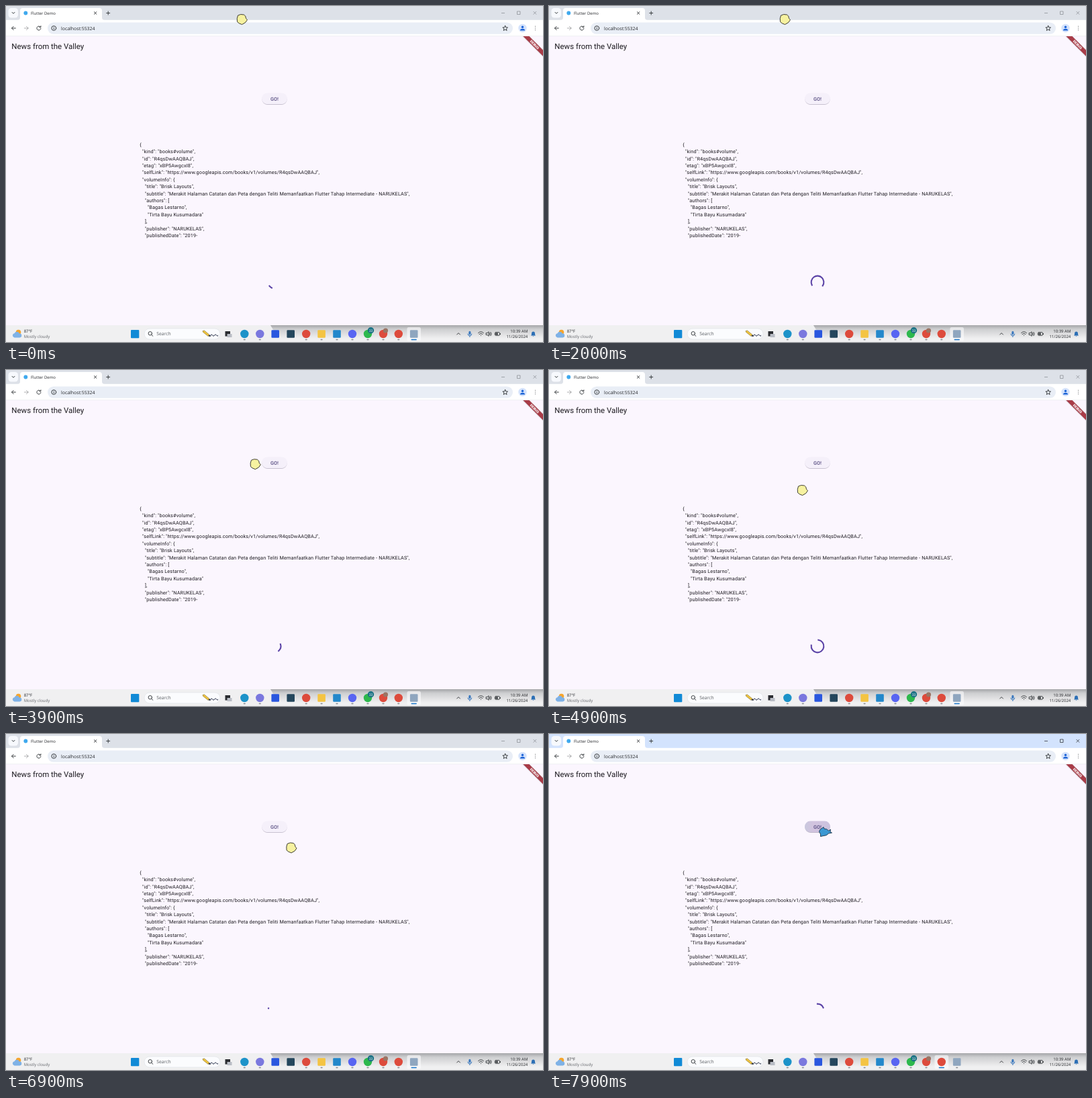
Recreate the animation shown at these times as an HTML page. Size 800 px wide and 500 px high, loop 8 s.

```html
<!DOCTYPE html>
<html lang="en">
<head>
<meta charset="utf-8">
<title>Browser demo</title>
<style>
  html, body { margin: 0; width: 100%; height: 100%; overflow: hidden; background: #fbf6fe; }
  svg { display: block; width: 800px; height: 500px; }
  text { white-space: pre; text-rendering: geometricPrecision; }
  .ui { font-family: "Open Sans", "Noto Sans", sans-serif; fill: #24262a; }
  .app { font-family: Roboto, "Noto Sans", sans-serif; fill: #1d1b20; }
  .line { fill: none; stroke: #3c4043; stroke-width: 1; stroke-linecap: round; stroke-linejoin: round; }
</style>
</head>
<body>
<svg viewBox="0 0 800 500" xmlns="http://www.w3.org/2000/svg">
  <defs>
    <linearGradient id="shade" x1="0" x2="0" y1="0" y2="1">
      <stop offset="0" stop-color="#77797d" stop-opacity=".62"/>
      <stop offset=".3" stop-color="#77797d" stop-opacity=".28"/>
      <stop offset="1" stop-color="#77797d" stop-opacity="0"/>
    </linearGradient>
    <linearGradient id="press">
      <stop offset="0" stop-color="#c9c8de"/>
      <stop offset=".35" stop-color="#d2c3df"/>
      <stop offset="1" stop-color="#cac2de"/>
    </linearGradient>
    <filter id="soft" x="-20%" y="-40%" width="140%" height="190%"><feGaussianBlur stdDeviation=".7"/></filter>
    <clipPath id="page"><rect y="45" width="800" height="430"/></clipPath>
  </defs>

  <!-- tab strip -->
  <rect id="strip" width="800" height="22"/>
  <rect x="3.5" y="3" width="14.5" height="14.5" rx="4.5" fill="#f7f9fd"/>
  <path class="line" d="M9 9.300l2 2 2-2"/>
  <path d="M17 21q4 0 4-4V7q0-4 4-4H139q4 0 4 4v10q0 4 4 4z" fill="#fff"/>
  <circle cx="29.300" cy="10.500" r="2.900" fill="#3fa9ee"/>
  <text class="ui" x="37" y="12.900" font-size="6">Flutter Demo</text>
  <path class="line" d="M131.300 8.700l3.600 3.600m0-3.600l-3.600 3.600M152.200 8v5m-2.500-2.500h5"/>
  <path id="win" fill="none" stroke-width=".7" d="M738 10.500h5M761.500 8h4.500v4.500h-4.500zM785.600 8l4.600 4.600m0-4.600l-4.600 4.600"/>

  <!-- toolbar -->
  <rect y="20.800" width="800" height="24.200" fill="#fff"/>
  <path class="line" d="M14.300 33H8.500m2.700-2.700L8.500 33l2.700 2.700"/>
  <path class="line" stroke-opacity=".4" d="M27.300 33h5.800m-2.700-2.700l2.700 2.700-2.700 2.700"/>
  <path class="line" d="M51.300 31.200a3 3 0 1 0 .6 2.200M51.900 29.700v2h-2"/>
  <rect x="62" y="24.500" width="693" height="17.200" rx="8.600" fill="#e9eef6"/>
  <circle class="line" cx="71.300" cy="33" r="3.400" stroke-width=".8"/>
  <path class="line" stroke-width=".8" d="M71.300 32.800v1.700M71.300 31.200v.1"/>
  <text class="ui" x="82" y="35.600" font-size="6.900">localhost:55324</text>
  <path class="line" stroke-width=".8" d="M743.700 29.300l1.100 2.500 2.700.2-2.100 1.800.7 2.700-2.400-1.500-2.400 1.500.7-2.700-2.100-1.800 2.700-.2z"/>
  <circle cx="769.500" cy="33" r="6.200" fill="#d5e3fc"/>
  <circle cx="769.500" cy="31.200" r="1.700" fill="#1a62d6"/>
  <path d="M766 36.600q0-2.800 3.500-2.800t3.500 2.800z" fill="#1a62d6"/>
  <path class="line" stroke-width="1.400" d="M788.500 30.200v.01M788.500 33v.01M788.500 35.800v.01"/>

  <!-- page -->
  <rect y="45" width="800" height="430" fill="#fbf6fe"/>
  <rect y="44.600" width="800" height=".5" fill="#dfe1e6"/>
  <text class="app" x="8.300" y="63.800" font-size="11.460">News from the Valley</text>
  <g clip-path="url(#page)">
    <g transform="translate(800 45) rotate(45)">
      <rect x="-32" y="14.600" width="64" height="6.600" fill="#000" opacity=".35" filter="url(#soft)"/>
      <rect x="-32" y="14.600" width="64" height="6.250" fill="#a93c48"/>
      <text class="app" y="19.600" font-size="5.300" font-weight="900" text-anchor="middle" style="fill:#fff">DEBUG</text>
    </g>
  </g>
  <rect id="shadow" x="381.300" width="37.400" height="16.700" rx="8.350" fill="#3a3050" filter="url(#soft)"/>
  <rect id="button" x="381" y="129.600" width="38" height="16.700" rx="8.350"/>
  <text class="app" x="400" y="140.500" font-size="7.290" font-weight="500" text-anchor="middle" style="fill:#54497f">GO!</text>
  <g id="json"></g>
  <path id="spinner" fill="none" stroke="#5a42a6" stroke-width="2.080" stroke-linecap="square"/>

  <!-- taskbar -->
  <rect y="475" width="800" height="25" fill="#f0f0f1"/>
  <path d="M394 475H800v20H412q-12-8-18-20z" fill="url(#shade)"/>
  <circle cx="18.500" cy="485.500" r="3.800" fill="#f6a52c"/>
  <path d="M12.500 493.500a3.200 3.200 0 0 1 0-6.300 4 4 0 0 1 7.300 0 3.100 3.100 0 0 1 .6 6.300z" fill="#7fb2e6"/>
  <text class="ui" x="26.700" y="485.700" font-size="6">87°F</text>
  <text class="ui" x="26.700" y="493.600" font-size="6" style="fill:#63666b">Mostly cloudy</text>
  <rect x="186" y="482" width="12.300" height="12.300" rx="1" fill="#118ad6"/>
  <rect x="206" y="480" width="113" height="16" rx="8" fill="#fbfcfe" stroke="#dcdfe5" stroke-width=".6"/>
  <circle class="line" cx="214.800" cy="487.200" r="2.700"/>
  <path class="line" d="M216.900 489.300l2 2"/>
  <text class="ui" x="224.300" y="490.400" font-size="6.800" style="fill:#5b5e63">Search</text>
  <path d="M293 483.500l2.500-.6 7.500 6.300-1.800 2.200-7.600-6z" fill="#efc43f" stroke="#6b5a25" stroke-width=".5"/>
  <path d="M301.300 491.200l1.700-2.100 2 3z" fill="#20242c"/>
  <path class="line" stroke-width="1.800" style="stroke:#17213c" d="M304 491q2-3.500 3.500-1t3.200 0 3 0 2.300.5"/>
  <path d="M326.500 484h7.500v7.500h-7.500z" fill="#2b2d31"/>
  <path d="M329.500 488h7v5h-7z" fill="#b9bdc5"/>
  <g id="dock"></g>
  <circle cx="543.500" cy="482.800" r="4.700" fill="#1c7285"/>
  <text class="ui" x="543.500" y="484.700" font-size="5" text-anchor="middle" style="fill:#fff">33</text>
  <circle cx="565.500" cy="483" r="3.600" fill="#9b7464"/>

  <!-- tray -->
  <path class="line" d="M671.700 489l2.400-2.400 2.400 2.400"/>
  <rect x="689.400" y="483.700" width="3" height="5.600" rx="1.500" fill="#3977bd"/>
  <path class="line" stroke-width=".7" style="stroke:#3977bd" d="M688 488q0 2.800 2.900 2.800t2.900-2.800M690.900 490.800v1.700"/>
  <path class="line" stroke-width=".9" d="M703.500 486.600q4-4 8 0M705 488.400q2.500-2.500 5 0M707.400 490.300h.2"/>
  <path class="line" stroke-width=".7" d="M715.500 486.600h1.600l2-1.900v6.600l-2-1.900h-1.600zM720.500 486.500q1.200 1.500 0 3M722 485.300q2.200 2.700 0 5.400"/>
  <rect class="line" x="728.500" y="485.600" width="7" height="4.600" rx="1" stroke-width=".7"/>
  <path d="M729.300 486.400h3.500v3h-3.500zM736 487h.8v2h-.8z" fill="#3c4043"/>
  <text class="ui" x="777.300" y="485.500" font-size="6" text-anchor="end">10:39 AM</text>
  <text class="ui" x="777.300" y="493.700" font-size="6" text-anchor="end">11/26/2024</text>
  <path d="M782 490.500q1-.8 1-2.700 0-3.300 2.500-3.300t2.500 3.300q0 1.900 1 2.700zM784.500 491h2q-1 1.500-2 0z" fill="#2c6fb5"/>

  <g id="cursor" stroke="#2b2a25" stroke-width=".9" stroke-linejoin="round">
    <path id="arrow" fill="#f7f2a0" d="M-6-5.500Q-2-8 3-6.500 6-5 6-1L8 1Q6.500 5.500 0 8-5 6.500-7 4-8-1-6-5.500z"/>
    <path id="hand" fill="#3b98d3" stroke="#20364a" d="M-8.500 0-7.500-3-2-7-1-4.500Q3-5 5.500-1.500L8.500-3.500 8 0 10.500 1.500 5.500 2.500Q3 6-2 6L-6.500 7-6.500 3.500z"/>
  </g>
</svg>
<script>
const LOOP = 8000, STEP = 100;
const HOVER = 7100, ACTIVE = 7800;
const $ = id => document.getElementById(id);
const set = (id, attrs) => { for (const k in attrs) $(id).setAttribute(k, attrs[k]); };

const json = `{
  "kind": "books#volume",
  "id": "R4qsDwAAQBAJ",
  "etag": "xBP5AwgcxI8",
  "selfLink": "https://www.googleapis.com/books/v1/volumes/R4qsDwAAQBAJ",
  "volumeInfo": {
    "title": "Brisk Layouts",
    "subtitle": "Merakit Halaman Catatan dan Peta dengan Teliti Memanfaatkan Flutter Tahap Intermediate - NARUKELAS",
    "authors": [
      "Bagas Lestarno",
      "Tirta Bayu Kusumadara"
    ],
    "publisher": "NARUKELAS",
    "publishedDate": "2019-`;
$('json').innerHTML = json.split('\n').map((s, i) =>
  `<text class="app" x="199.2" y="${208.7 + i * 10.417}" font-size="7.29" letter-spacing=".138">${s}</text>`).join('');

// dock icons: centre x, colour, round, running
const icons = [
  [355.3, '#1d93c9', 1, 1], [378.3, '#7a78de', 1, 1], [401.2, '#2a57df', 0, 0],
  [424.2, '#24465c', 0, 0], [447.2, '#dd4b3c', 1, 1], [470.1, '#f4c443', 0, 1],
  [493, '#2388cb', 0, 1], [516, '#5865f2', 1, 1], [539, '#2db84d', 1, 1],
  [562, '#dd4b3c', 1, 1], [584.8, '#dd4b3c', 1, 1], [607.7, '#8fa6bf', 0, 1]
];
const CHROME = 10, SNIP = 11;
$('dock').innerHTML = icons.map(([x, fill, round, on], i) => {
  const r = round ? 6.2 : 5.8;
  return `<rect id="tile${i}" x="${x - 10.3}" y="478" width="20.6" height="20.6" rx="2.5" fill="#fbfcfe" opacity="0"/>
    <rect x="${x - r}" y="${488 - r}" width="${2 * r}" height="${2 * r}" rx="${round ? r : 1.2}" fill="${fill}"/>
    ${on ? `<rect id="bar${i}" y="495.7" height="1.5" rx=".75"/>` : ''}`;
}).join('');

function drawDock(active) {
  icons.forEach(([x, , , on], i) => {
    const lit = i === active, w = lit ? 8.4 : 3.2;
    set('tile' + i, { opacity: lit ? .6 : 0 });
    if (on) set('bar' + i, { x: x - w / 2, width: w, fill: lit ? '#1773c8' : '#85888e' });
  });
}

// cubic-bezier(.4, 0, .2, 1)
function ease(x) {
  if (x <= 0) return 0;
  if (x >= 1) return 1;
  let lo = 0, hi = 1, s;
  for (let i = 0; i < 24; i++) {
    s = (lo + hi) / 2;
    const at = 1.2 * s * (1 - s) ** 2 + .6 * s * s * (1 - s) + s ** 3;
    if (at < x) lo = s; else hi = s;
  }
  return s * s * (3 - 2 * s);
}

function drawSpinner(t) {
  const wrap = v => v - Math.floor(v);
  const phase = wrap((t - 2900) / 1333 - .01), turn = (t - 2900) / 2222;
  const head = ease(phase * 2), tail = ease(phase * 2 - 1);
  const from = Math.PI * (-.5 + 1.5 * tail + 2 * turn + .5 * phase);
  const sweep = Math.max(1.5 * Math.PI * (head - tail), .01);
  const r = 9.375, at = a => `${400 + r * Math.cos(a)} ${411 + r * Math.sin(a)}`;
  set('spinner', { d: `M${at(from)}A${r} ${r} 0 ${+(sweep > Math.PI)} 1 ${at(from + sweep)}` });
}

// time, x, y
const path = [
  [0, 351.5, 19.5], [3000, 351.5, 19.5], [3500, 362, 80], [4200, 377.5, 178.5],
  [5200, 377.5, 178.5], [5900, 482, 263.5], [6400, 482, 263.5], [HOVER, 411, 145.5], [LOOP, 411, 145.5]
];
function drawCursor(t) {
  const i = path.findIndex(p => p[0] > t);
  const [t0, x0, y0] = path[i - 1], [t1, x1, y1] = path[i];
  const k = (t - t0) / (t1 - t0), e = k * k * (3 - 2 * k);
  set('cursor', { transform: `translate(${x0 + (x1 - x0) * e} ${y0 + (y1 - y0) * e})` });
  set('arrow', { visibility: t < HOVER ? 'visible' : 'hidden' });
  set('hand', { visibility: t < HOVER ? 'hidden' : 'visible' });
}

function draw(t) {
  const active = t >= ACTIVE, raised = t >= HOVER && !active;
  set('strip', { fill: active ? '#d3e3fd' : '#dde1e8' });
  set('win', { stroke: active ? '#202124' : '#85898f' });
  set('button', { fill: active ? 'url(#press)' : raised ? '#e9e3f4' : '#f5f0fa' });
  set('shadow', { y: raised ? 131 : 130.2, opacity: raised ? .55 : .34 });
  drawDock(active ? CHROME : SNIP);
  drawSpinner(t);
  drawCursor(t);
}

const start = performance.now();
function frame() {
  const t = (performance.now() - start) % LOOP;
  draw(Math.floor(t / STEP) * STEP);
  requestAnimationFrame(frame);
}
frame();
</script>
</body>
</html>
```
